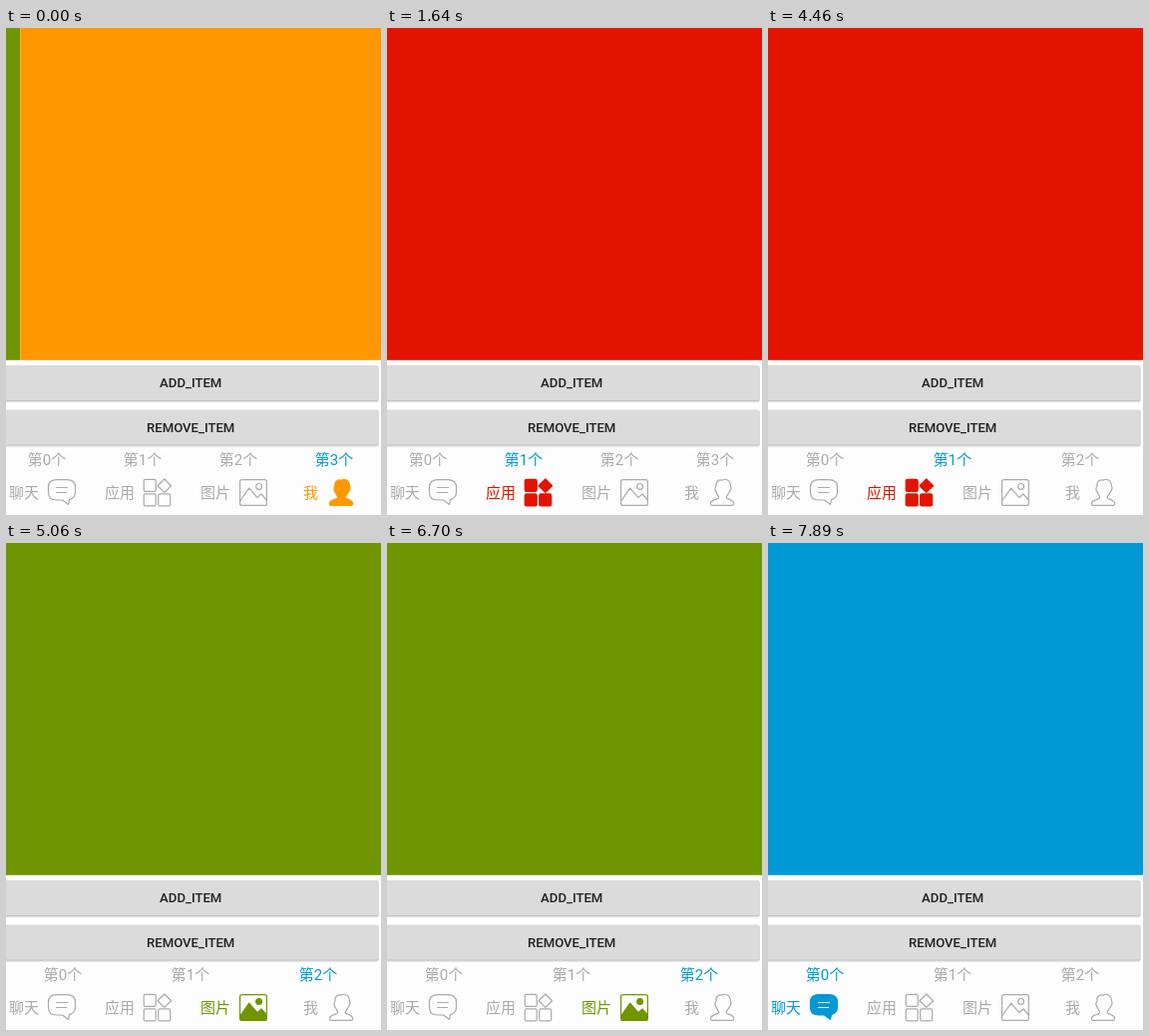
These frames come from a looping animation (376x488 px, 8000 ms). An HTML page:

```html
<!DOCTYPE html>
<html lang="zh-CN">
<head>
<meta charset="utf-8">
<title>Tabbed pager</title>
<style>
html, body { margin: 0; width: 100%; height: 100%; overflow: hidden; background: #fdfdfd; }
svg { display: block; }
text { font: 15px Roboto, "Noto Sans CJK SC", "Noto Sans CJK", sans-serif; }
.label { font-weight: 500; font-size: 13.15px; fill: #212121; text-anchor: middle; }
.tab { text-anchor: middle; }
.item { color: #aaa; }
.item text { fill: currentColor; }
.icon { fill: none; stroke: currentColor; stroke-width: 1.2; stroke-linejoin: round; stroke-linecap: round; }
.on .fill { fill: currentColor; }
.on .ink { stroke: #fff; }
</style>
</head>
<body>
<svg id="stage" width="376" height="488" viewBox="0 0 376 488">
  <rect y="332" width="376" height="90" fill="#fff"/>
  <g id="pages"></g>
  <g id="buttons"></g>
  <g id="tabs"></g>
  <g id="items">
    <g class="item"><text x="3" y="470.5">聊天</text>
      <g class="icon">
        <path class="fill" d="M51 452.6H61Q69.5 452.6 69.5 460V465Q69.5 471 63.5 472.6L62.6 477.4 56.5 473H51Q42.5 473 42.5 465.5V460Q42.5 452.6 51 452.6Z"/>
        <path class="ink" d="M50.5 460.5H61.5M50.5 465.5H60.5"/>
      </g></g>
    <g class="item"><text x="99" y="470.5">应用</text>
      <g class="icon">
        <rect class="fill" x="138.2" y="452.4" width="12" height="12" rx="1.5"/>
        <rect class="fill" x="138.2" y="466.9" width="12" height="12" rx="1.5"/>
        <rect class="fill" x="152.7" y="466.9" width="12" height="12" rx="1.5"/>
        <path class="fill" d="M158.8 452L165.6 458.7 158.8 465.4 152 458.7Z"/>
      </g></g>
    <g class="item"><text x="195" y="470.5">图片</text>
      <g class="icon">
        <rect x="234.6" y="452.6" width="26.8" height="25.8" rx="2"/>
        <path class="fill" d="M235 473.5L243.7 461.2 252 470.6 256 467 261 472.5V478H235Z" stroke="none"/>
        <path d="M235 473.5L243.7 461.2 252 470.6 256 467 261 472.5"/>
        <circle class="fill" cx="253.6" cy="459.4" r="2.9"/>
      </g></g>
    <g class="item"><text x="298" y="470.5">我</text>
      <g class="icon">
        <path class="fill" d="M330 459C329 454.5 333 452 336 453.2C339 451 344.5 453 344.3 458.5C346 461 344.2 464 342.6 466C341.8 468 339.8 469 340.2 470.8C341 472.6 347.8 472.6 347.8 476.6Q347.8 478.4 346 478.4H326Q324.4 478.4 324.4 476.6C324.4 472.6 332 472.6 332.6 470.8C333 469 331 468 330.4 465.5C328.6 463.5 328.6 461 330 459Z"/>
      </g></g>
  </g>
</svg>
<script>
const W = 376, LOOP = 8000;
const TICK = 148.8, LEAD = 6; // the picture is refreshed once per tick
const REMOVE_TICK = 20;
const COLORS = ['#0099d6', '#e21400', '#6f9500', '#ff9800'];
const GRAY = '#aaa';

// Each swipe: the tick it settles on, its length in ticks, the page it reaches.
const SWIPES = [
  [1, 4, 3], [6, 3, 2], [11, 4, 1], [15, 3, 0],
  [30, 4, 1], [34, 4, 2], [38, 4, 3],
  [45, 4, 2], [49, 4, 1], [53, 3, 0]
];

const $ = id => document.getElementById(id);

function add(parent, tag, attrs, text) {
  const el = document.createElementNS('http://www.w3.org/2000/svg', tag);
  for (const k in attrs) el.setAttribute(k, attrs[k]);
  if (text) el.textContent = text;
  return parent.appendChild(el);
}

const pages = COLORS.map(fill => add($('pages'), 'rect', { width: W, height: 332.8, fill }));

function button(y, text) {
  ['#f4f4f4', '#e0e0e0', '#c4c4c4', '#dbdbdb'].forEach((fill, i) =>
    add($('buttons'), 'rect', { x: -4, y: y + 3 - i, width: 377.7, height: 35, rx: 2, fill }));
  add($('buttons'), 'text', { x: 185.2, y: y + 22, class: 'label' }, text);
}
button(338, 'ADD_ITEM');
button(382.5, 'REMOVE_ITEM');

const tabs = COLORS.map((c, i) => add($('tabs'), 'text', { y: 438, class: 'tab' }, `第${i}个`));
const items = [...$('items').children];

// Finger drag followed by a quick settle.
const ease = u => Math.sin((1 - (1 - u) ** 1.5) * Math.PI / 2) ** 2;

function position(tick) {
  let pos = 2;
  for (const [end, length, page] of SWIPES) {
    const u = Math.min(1, Math.max(0, 1 - (end - tick) / length));
    pos += (page - pos) * ease(u);
  }
  return pos;
}

function draw(t) {
  const tick = Math.floor((t + LEAD) / TICK);
  const pos = position(tick);
  const page = Math.round(pos);
  const count = tick < REMOVE_TICK ? 4 : 3;
  const cell = 384 / count;
  pages.forEach((p, i) => p.setAttribute('x', (i - pos) * W));
  tabs.forEach((tab, i) => {
    tab.setAttribute('x', -7 + cell * (i + 0.5));
    tab.setAttribute('fill', i === Math.min(page, count - 1) ? COLORS[0] : GRAY);
    tab.style.display = i < count ? '' : 'none';
  });
  items.forEach((item, i) => {
    item.classList.toggle('on', i === page);
    item.style.color = i === page ? COLORS[i] : GRAY;
  });
}

function frame() {
  draw(performance.now() % LOOP);
  requestAnimationFrame(frame);
}
frame();
</script>
</body>
</html>
```
